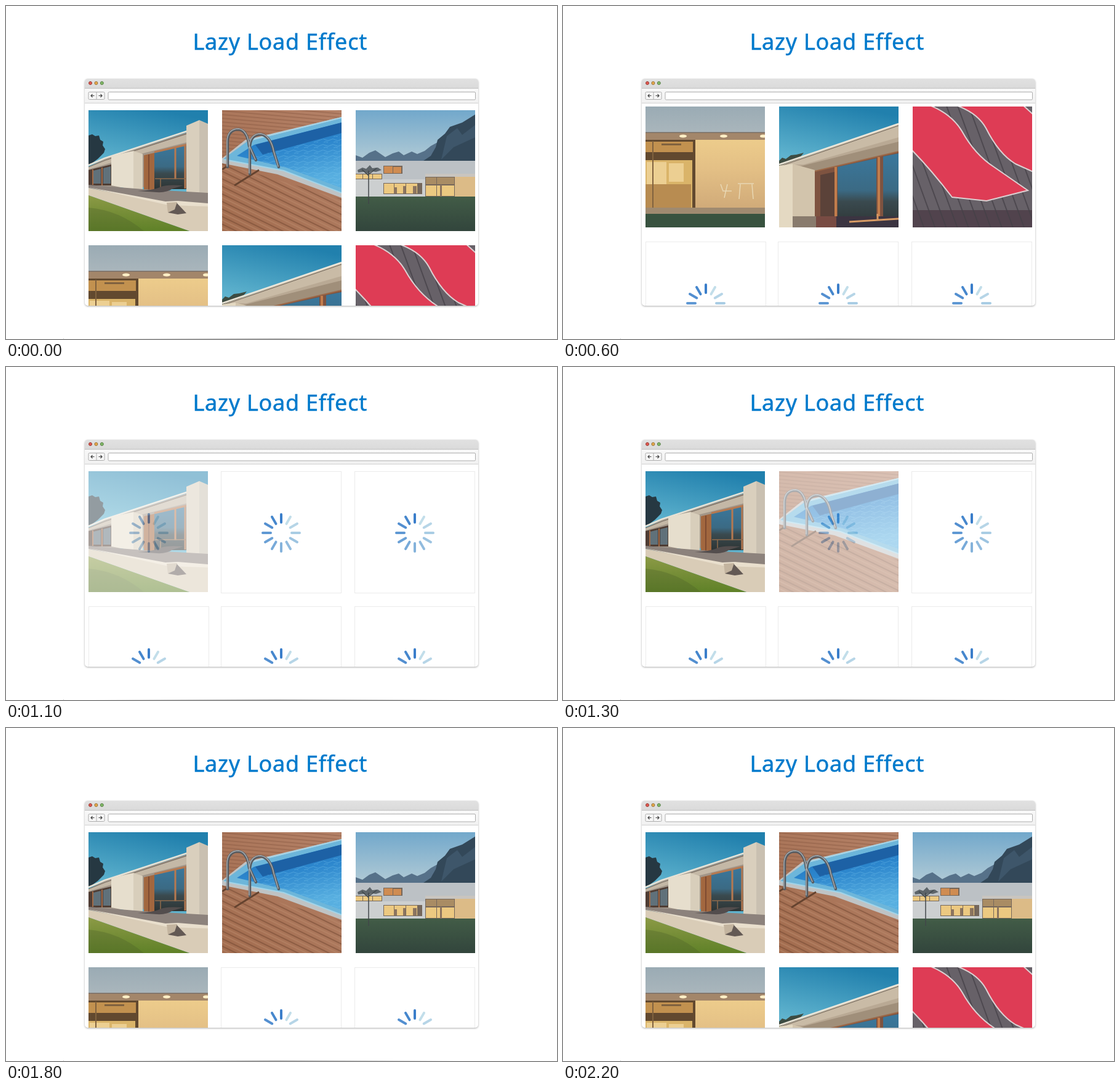
Recreate the animation shown at these times as an HTML page. Size 895x540 px, loop 3200 ms.

```html
<!DOCTYPE html>
<html lang="en">
<head>
<meta charset="utf-8">
<title>Lazy Load Effect</title>
<style>
  html, body { margin: 0; width: 100%; height: 100%; overflow: hidden; background: #fff; }
  svg.stage { display: block; width: 895px; height: 540px; }
  .title { font: 36px "Noto Sans", "Open Sans", sans-serif; letter-spacing: .75px; fill: #007acc; stroke: #007acc; stroke-width: .5px; }
  .window { filter: drop-shadow(0 1px 1.5px rgba(0, 0, 0, .32)); }

  /* The ease curve is sampled every 100 ms, so the page moves in hard steps. */
  #page { animation: scroll 3200ms step-end infinite; }
  @keyframes scroll {
    0% { transform: translateY(0); }
    15.625% { transform: translateY(-40px); }
    18.75% { transform: translateY(-225px); }
    21.875% { transform: translateY(-351px); }
    25% { transform: translateY(-412px); }
    28.125% { transform: translateY(-435px); }
    31.25% { transform: translateY(-438px); }
    68.75%, 100% { transform: translateY(0); }
  }

  .late, .frame { animation: 3200ms step-end calc(1100ms + var(--i) * 200ms) infinite; }
  .late { opacity: 0; animation-name: load; }
  .frame { fill: #fff; stroke: #ebebeb; animation-name: unframe; }
  @keyframes load {
    0% { opacity: .5; }
    3.125% { opacity: 1; }
    40%, 100% { opacity: 0; }
  }
  @keyframes unframe {
    0% { stroke: transparent; }
    40%, 100% { stroke: #ebebeb; }
  }
</style>
</head>
<body>
<svg class="stage" viewBox="0 0 895 540">
  <defs>
    <clipPath id="view"><path d="M128 158H767V482Q767 486 763 486H132Q128 486 128 482Z"/></clipPath>

    <linearGradient id="bar" x2="0" y2="1"><stop stop-color="#e1e1e1"/><stop offset="1" stop-color="#dadada"/></linearGradient>
    <linearGradient id="tool" x2="0" y2="1"><stop stop-color="#f8f8f8"/><stop offset="1" stop-color="#f1f1f1"/></linearGradient>
    <linearGradient id="rule"><stop stop-color="#aaa" stop-opacity="0"/><stop offset=".5" stop-color="#aaa"/><stop offset="1" stop-color="#aaa" stop-opacity="0"/></linearGradient>
    <linearGradient id="noon" x1=".6" x2=".4" y2="1"><stop stop-color="#2180ad"/><stop offset=".5" stop-color="#5fb3ce"/></linearGradient>
    <linearGradient id="dusk" x2="0" y2="1"><stop stop-color="#72a8cb"/><stop offset="1" stop-color="#bfd2d8"/></linearGradient>
    <linearGradient id="lawn" x2="0" y2="1"><stop stop-color="#8c9a46"/><stop offset="1" stop-color="#5f8128"/></linearGradient>
    <linearGradient id="evening" x2="0" y2="1"><stop stop-color="#425c47"/><stop offset="1" stop-color="#32453c"/></linearGradient>
    <linearGradient id="water" x2=".3" y2="1"><stop stop-color="#1b69b0"/><stop offset=".5" stop-color="#2c86cd"/><stop offset="1" stop-color="#58afe0"/></linearGradient>
    <linearGradient id="glass" x2="0" y2="1"><stop stop-color="#3a789d"/><stop offset=".5" stop-color="#3b6a84"/><stop offset=".65" stop-color="#3a4a4f"/><stop offset="1" stop-color="#2d3434"/></linearGradient>
    <linearGradient id="warm" x2="0" y2="1"><stop stop-color="#efcf8d"/><stop offset=".45" stop-color="#e3bf85"/><stop offset="1" stop-color="#cda777"/></linearGradient>
    <linearGradient id="concrete" x2="0" y2="1"><stop stop-color="#9aabb4"/><stop offset="1" stop-color="#aab6bc"/></linearGradient>
    <linearGradient id="deckShade" x1="1" x2="0" y2="1"><stop stop-color="#b58268"/><stop offset="1" stop-color="#a26c4e"/></linearGradient>

    <pattern id="boards" width="200" height="11" patternUnits="userSpaceOnUse" patternTransform="rotate(26)"><path d="M0 1H200" stroke="#70452f" stroke-width="1.2"/><path d="M0 6H200" stroke="#b98a6c" stroke-width="2" opacity=".5"/></pattern>
    <pattern id="farBoards" width="200" height="6" patternUnits="userSpaceOnUse" patternTransform="rotate(5)"><path d="M0 1H200" stroke="#85543f" stroke-width=".8"/></pattern>
    <pattern id="slats" width="17" height="300" patternUnits="userSpaceOnUse" patternTransform="rotate(-20)"><path d="M1 0V300" stroke="#444046" stroke-width="1.5"/></pattern>
    <pattern id="ripples" width="16" height="9" patternUnits="userSpaceOnUse"><path d="M0 3q4-3 8 0t8 0M5 7q3-2 7 0" fill="none" stroke="#80cbf0" stroke-opacity=".35"/></pattern>

    <symbol id="villa" viewBox="0 0 194 196">
      <path fill="url(#noon)" d="M0 0H194V196H0z"/>
      <path fill="#263842" d="M0 41l6-2 5 3 6-1 2 7 5 3-1 6 4 6-2 6-10 10-15 11z"/>
      <path fill="#a29689" d="M0 92L28 78 160 36V125H0z"/>
      <path fill="#c4b8a6" d="M0 92L28 80 160 39V52L88 70 0 96z"/>
      <path fill="none" stroke="#e9e3d6" stroke-width="2.500" d="M0 89L26 78 160 34"/>
      <path fill="none" stroke="#71675e" d="M0 92L28 81 160 38"/>
      <path fill="#4f3d34" d="M0 97L37 88V122H0z"/>
      <path fill="#60717a" d="M8 98l12-3v24H8zM24 94l12-3v28H24z"/>
      <path fill="none" stroke="#a26b48" stroke-width="2" d="M7 96v25M22 93v29"/>
      <path fill="#e6decd" d="M37 74L73 66V129L37 122z"/>
      <path fill="#d8cebb" d="M73 66L88 71V130H73z"/>
      <path fill="#a2673f" d="M90 73L107 69V130H90z"/>
      <path fill="#7d4a31" d="M97 72h2v57h-2z"/>
      <path fill="url(#glass)" d="M107 68L159 55V128H107z"/>
      <path fill="none" stroke="#b67950" stroke-width="3" d="M107 68L159 56M141 60V112M157 56V127"/>
      <path fill="none" stroke="#8f6b4c" stroke-width="1.500" d="M108 111h50M117 111v18"/>
      <path fill="#d9cfbd" d="M159 25L180 16V137H159z"/>
      <path fill="#c9c0b1" d="M180 16L194 22V137H180z"/>
      <path fill="#8c827c" d="M0 121L88 128 194 134V153H135L0 126z"/>
      <path fill="#534d4d" d="M80 131q24-1 36-6 7-5 38-3l-17 5q-10 7-26 6z"/>
      <path fill="#d9ccb7" d="M0 126L125 150 194 152V196H164L0 138z"/>
      <path fill="#e9dfcd" d="M0 125L125 148 145 147 194 151V156L130 154z"/>
      <path fill="#635954" d="M143 150l16 17-14 2-16-3z"/>
      <path fill="#c3b49f" d="M127 150l17-1-4 12-11 5z"/>
      <path fill="url(#lawn)" d="M0 138L164 196H0z"/>
      <path fill="#4e6329" opacity=".35" d="M0 158q50 4 90 38H0z"/>
    </symbol>

    <symbol id="pool" viewBox="0 0 194 196">
      <path fill="url(#deckShade)" d="M0 0H194V196H0z"/>
      <path fill="url(#farBoards)" d="M0 0H194V16L40 50 0 76z"/>
      <path fill="url(#boards)" d="M0 86L194 144V196H0z"/>
      <path fill="#bfc3c4" d="M0 78L38 48 194 11V142L90 104 0 86z"/>
      <path fill="#6db6da" d="M2 79L40 51 194 13V134L100 98z"/>
      <path fill="url(#water)" d="M24 74L52 56 194 20V126L104 93z"/>
      <path fill="#1d61a5" d="M54 56L194 20V37L66 72z"/>
      <path fill="url(#ripples)" d="M40 78L194 39V126L104 93z"/>
      <path fill="none" stroke="#a3d4e8" stroke-width="2" d="M4 80L100 98 194 134M40 50L194 12"/>
      <path fill="none" stroke="#65432f" stroke-width="3" d="M60 97L20 122M8 91L0 96"/>
      <g fill="none" stroke-linecap="round">
        <path stroke="#565c62" stroke-width="4.500" d="M9 92V50Q10 31 27 31 41 33 44 58L55 81M45 103V60Q46 39 63 39 79 42 84 68L92 92"/>
        <path stroke="#a7acb0" stroke-width="1.500" d="M8 91V50Q9 30 27 30 41 32 44 57L54 80M44 102V60Q45 38 63 38 79 41 84 67L91 91"/>
      </g>
    </symbol>

    <symbol id="lodge" viewBox="0 0 194 196">
      <path fill="url(#dusk)" d="M0 0H194V100H0z"/>
      <path fill="#567189" d="M0 73L11 77 22 69 32 65 48 76 60 70 70 67 78 73 91 67 100 71 112 66 122 58 133 52V84H0z"/>
      <path fill="#334859" d="M110 82L122 74 130 60 133 48 145 38 153 27 173 20 194 7V84H110z"/>
      <path fill="#3e566a" d="M148 42l17-13 8 11 21-16v20l-35 16-20 20z"/>
      <path fill="#bcc1c5" d="M0 82H194V141H0z"/>
      <path fill="#cccfd0" d="M0 112H113V140H0z"/>
      <path fill="#75675b" d="M45 90h31v13H45zM0 103h43v9H0zM45 118h63v18H45zM113 103h81v37h-81z"/>
      <path fill="#cf8c52" d="M46 91h14v11H46zM61 92h13v10H61z"/>
      <path fill="#ecc981" d="M0 104h11v7H0zM12 104h15v7H12zM28 104h14v7H28zM46 119h16v16H46zM63 119h18v16H63zM82 119h18v16H82zM132 122h28v17h-28zM114 122h17v17h-17z"/>
      <path fill="#a98c64" d="M114 109h17v11h-17zM132 109h28v11h-28z"/>
      <path fill="#dcbb87" d="M161 108h33v32h-33z"/>
      <path fill="#8b745f" d="M62 125h5v10h-5zM77 123h4v12h-4zM93 123h6v12h-6zM137 121h3v19h-3z"/>
      <path fill="#c9c5bf" d="M113 103h81v5h-81z"/>
      <path fill="url(#evening)" d="M0 140H194V196H0z"/>
      <path fill="none" stroke="#41474a" stroke-width="1.500" d="M21 152V98M21 106L10 96M21 104L34 94"/>
      <path fill="#3f474c" opacity=".75" d="M3 97l8-4 6 2 6-6 4 5 9-1 6 4-9 3-7-1-6 4-7-3-9 1z"/>
    </symbol>

    <symbol id="porch" viewBox="0 0 194 196">
      <path fill="url(#concrete)" d="M0 0H194V43H0z"/>
      <path fill="url(#warm)" d="M0 42H194V176H0z"/>
      <path fill="#a3866a" d="M0 42H194V54H0z"/>
      <path fill="#796b60" d="M0 41.500H194V43H0z"/>
      <path fill="#62492f" d="M0 54H81V176H0z"/>
      <path fill="#c2914f" d="M0 57H11V74H0zM13 57H77V74H13z"/>
      <path fill="#80623f" d="M26 60h32v3H26z"/>
      <path fill="#dab469" d="M0 87H76V165H0z"/>
      <path fill="#eccf92" d="M2 90H34V128H2zM38 92H62V122H38z"/>
      <path fill="#b88c51" d="M0 126H74V165H0z"/>
      <path fill="#80623f" d="M11 56h2v109h-2z"/>
      <g fill="#ffefc6"><ellipse cx="61" cy="48" rx="6" ry="2.5"/><ellipse cx="127" cy="48" rx="6" ry="2.5"/><ellipse cx="191" cy="48" rx="5" ry="2.5"/></g>
      <path fill="none" stroke="#e9d8b4" stroke-width="1.500" d="M122 126l4 11h14M150 125h26M154 126l-2 24M173 126l2 24M133 126l-5 22"/>
      <path fill="#9f8a70" d="M0 164H194V176H0z"/>
      <path fill="#38523f" d="M0 174H194V196H0z"/>
    </symbol>

    <symbol id="eaves" viewBox="0 0 194 196">
      <path fill="url(#noon)" d="M0 0H194V196H0z"/>
      <path fill="#3d4c42" d="M0 88l5-5 6 2 8-6 9-1 12-3-12 15-28 10z"/>
      <path fill="#b9a994" d="M0 96L194 28V73L58 105 22 95z"/>
      <path fill="#c9bba6" d="M6 94L194 29V50L40 94z"/>
      <path fill="#a08f7a" d="M34 97L194 57V73L58 105z"/>
      <path fill="none" stroke="#efe8da" stroke-width="2.500" d="M0 94L194 28"/>
      <path fill="none" stroke="#6f6459" d="M4 96L194 31"/>
      <path fill="#e4d9c2" d="M0 96L22 93V196H0z"/>
      <path fill="#d2c4ac" d="M22 93L58 103V196H22z"/>
      <path fill="#7e5340" d="M58 105L194 73V196H58z"/>
      <path fill="#5b4239" d="M67 111l23-5v80H67z"/>
      <path fill="url(#glass)" d="M95 98L158 84V196H95zM169 81L194 76V196H169z"/>
      <path fill="none" stroke="#9c6847" stroke-width="2" d="M58 105L194 73"/>
      <path fill="none" stroke="#c27d4c" stroke-width="4" d="M92 98V182M162 82V196"/>
      <path fill="#897b6d" d="M22 178H60V196H22z"/>
      <path fill="#784b43" d="M60 178H93V196H60z"/>
      <path fill="#3b3441" d="M93 178H194V196H93z"/>
      <path fill="none" stroke="#d79a64" stroke-width="3" d="M114 187L194 182M160 174V185"/>
    </symbol>

    <symbol id="loungers" viewBox="0 0 194 196">
      <path fill="#676168" d="M0 0H194V196H0z"/>
      <path fill="url(#slats)" d="M0 0H194V196H0z"/>
      <g fill="#de3c55" stroke="#dcd0d1" stroke-width="2">
        <path d="M-4 -4H22Q62 10 80 40 101 78 132 98L187 136 120 153 64 147Q28 100 -4 68z"/>
        <path d="M64 -4Q104 8 119 35 140 77 167 93L198 107V15L177 -4z"/>
      </g>
      <path fill="#51434d" d="M0 168H194V196H0z"/>
      <path fill="url(#slats)" d="M0 168H194V196H0z"/>
    </symbol>

    <g id="spinner" stroke-width="4" stroke-linecap="round"></g>
  </defs>

  <rect width="895" height="540" fill="#fff"/>
  <text class="title" x="303.5" y="71">Lazy Load Effect</text>

  <rect class="window" x="128" y="118" width="639" height="368" rx="5" fill="#fff"/>
  <path fill="url(#bar)" d="M128 134V123Q128 118 133 118H762Q767 118 767 123V134z"/>
  <path fill="url(#tool)" d="M128 134H767V157H128z"/>
  <path stroke="#c2c2c2" d="M128 133.500H767"/>
  <path stroke="#d2d2d2" d="M128 157.500H767"/>
  <g stroke-width="1">
    <circle cx="137" cy="125" r="2.5" fill="#e4584f" stroke="#96413b"/>
    <circle cx="146.4" cy="125" r="2.5" fill="#e9ab4b" stroke="#94703a"/>
    <circle cx="155.8" cy="125" r="2.5" fill="#83bb68" stroke="#557d45"/>
  </g>
  <g fill="#fff" stroke="#adadad">
    <rect x="134" y="139.5" width="26" height="12" rx="1.5" fill="#f7f7f7"/>
    <path d="M147 140V151"/>
    <rect x="166" y="139.5" width="596.5" height="12.5" rx="1.5"/>
  </g>
  <path fill="none" stroke="#444" stroke-width="1.2" d="M143.500 145.500H138M140.500 143L138 145.500 140.500 148M150.500 145.500H156M153.500 143L156 145.500 153.500 148"/>

  <g clip-path="url(#view)"><g id="page"></g></g>

  <path fill="url(#rule)" d="M145 539H735V540H145z"/>
  <path fill="#ccc" d="M93 539h1v1h-1z"/>
</svg>
<script>
  const photos = ["villa", "pool", "lodge", "porch", "eaves", "loungers"];
  const photoX = [134, 351, 568], frameX = [134, 349, 566];
  const top0 = 169, rowStep = 219, scrollEnd = 2 * rowStep;

  const mix = (a, b, k) => Math.round(a + (b - a) * k);
  const spoke = (_, i) => {
    const k = i / 11;
    const color = `rgb(${mix(58, 194, k)},${mix(126, 222, k)},${mix(202, 234, k)})`;
    return `<path d="M0-17V-30" stroke="${color}" transform="rotate(${-30 * i})"/>`;
  };
  const photo = (id, i, y, cls) =>
    `<use href="#${id}" class="${cls}" style="--i:${i}" x="${photoX[i % 3]}" y="${y}" width="194" height="196"/>`;
  const holder = (i, x, y) =>
    `<rect class="frame" style="--i:${i}" x="${x + .5}" y="${y + .5}" width="195" height="197"/>
     <use href="#spinner" x="${x + 98}" y="${y + 100}"/>`;

  document.getElementById("spinner").innerHTML = Array.from({ length: 12 }, spoke).join("");
  document.getElementById("page").innerHTML = photos.map((id, i) => {
    const y = top0 + rowStep * Math.floor(i / 3), below = y + scrollEnd;
    return photo(id, i, y, "ready") + holder(i, frameX[i % 3], below) + photo(id, i, below, "late");
  }).join("");
</script>
</body>
</html>
```
